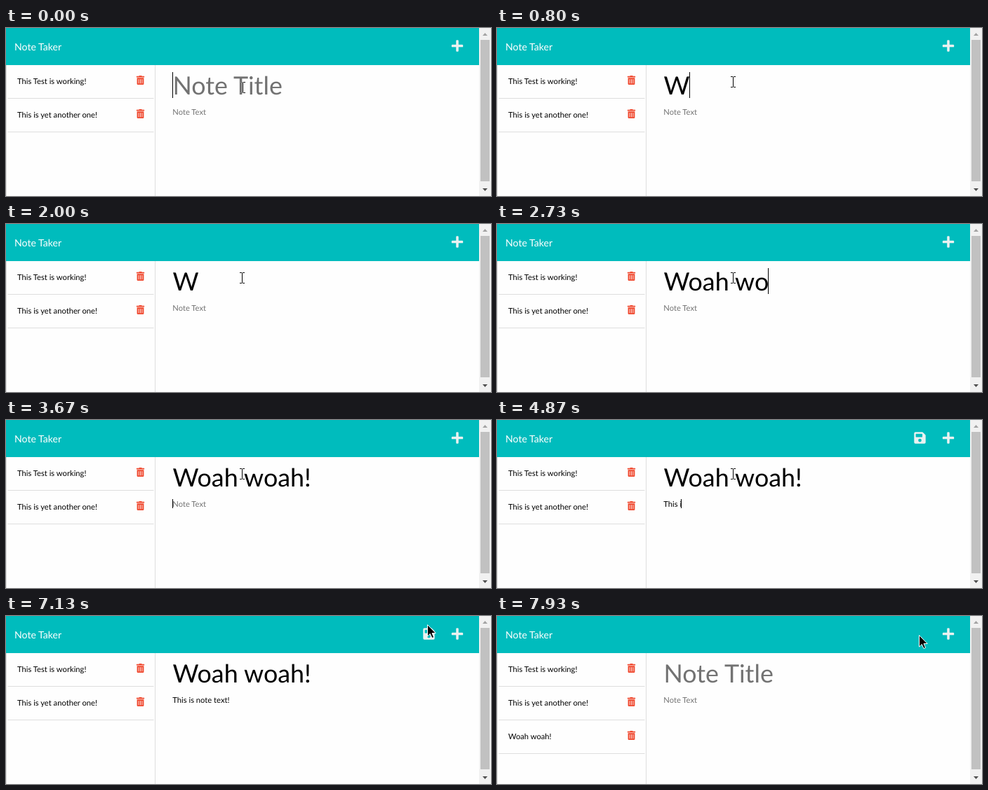
These frames come from a looping animation (691x240 px, 8 s). An HTML page:

```html
<!DOCTYPE html>
<html lang="en">
<head>
<meta charset="utf-8">
<title>Note Taker</title>
<style>
  html, body { margin: 0; width: 100%; height: 100%; overflow: hidden; background: #fefefe; }
  svg { display: block; width: 691px; height: 240px; }
  text { font-family: Lato, sans-serif; font-size: 11.2px; white-space: pre; text-rendering: geometricPrecision; }
  #title { font-size: 35.8px; }
  .brand { font-size: 14.1px; fill: #fff; }
  .line { fill: #dedede; }
  .light { fill: #ebf2f1; }
  #beam { mix-blend-mode: difference; fill: #fff; }
</style>
</head>
<body>
<svg viewBox="0 0 691 240" xmlns="http://www.w3.org/2000/svg">
  <defs>
    <path id="trash" transform="scale(.0254)" fill="#f0492f" d="M32 464a48 48 0 0 0 48 48h288a48 48 0 0 0 48-48V128H32zm272-256a16 16 0 0 1 32 0v224a16 16 0 0 1-32 0zm-96 0a16 16 0 0 1 32 0v224a16 16 0 0 1-32 0zm-96 0a16 16 0 0 1 32 0v224a16 16 0 0 1-32 0zM432 32H312l-9.4-18.7A24 24 0 0 0 281 0H167a24 24 0 0 0-21.4 13.3L136 32H16A16 16 0 0 0 0 48v32a16 16 0 0 0 16 16h416a16 16 0 0 0 16-16V48a16 16 0 0 0-16-16z"/>
  </defs>
  <rect width="691" height="240" fill="#fefefe"/>
  <rect width="674" height="53" fill="#00bcbd"/>
  <text class="brand" x="12" y="32">Note Taker</text>
  <path id="save" class="light" transform="translate(594.3 16.2) scale(.0366)" d="M434 130l-84-84A48 48 0 0 0 316 32H48A48 48 0 0 0 0 80v352a48 48 0 0 0 48 48h352a48 48 0 0 0 48-48V164a48 48 0 0 0-14-34zM224 416a64 64 0 0 1 0-128a64 64 0 0 1 0 128zm96-304V212a12 12 0 0 1-12 12H76a12 12 0 0 1-12-12V108a12 12 0 0 1 12-12h228z"/>
  <path class="light" transform="translate(634.8 16.2) scale(.0366)" d="M416 208H272V64a32 32 0 0 0-32-32h-32a32 32 0 0 0-32 32v144H32a32 32 0 0 0-32 32v32a32 32 0 0 0 32 32h144v144a32 32 0 0 0 32 32h32a32 32 0 0 0 32-32V304h144a32 32 0 0 0 32-32v-32a32 32 0 0 0-32-32z"/>

  <rect class="line" y="53" width="1" height="187"/>
  <rect class="line" x="212" y="53" width="1" height="187"/>
  <g id="list"></g>

  <text id="title" x="237.5" y="95"></text>
  <text id="note" x="237.3" y="124"></text>
  <rect id="caret" width="1"/>

  <rect x="674" width="17" height="240" fill="#f1f1f1"/>
  <rect x="676" y="17" width="13" height="202" fill="#c1c1c1"/>
  <path d="M679 11l3.5-4 3.5 4z" fill="#a3a3a3"/>
  <path d="M679 229h7l-3.5 4z" fill="#505050"/>

  <path id="beam" d="M-3 -8h3v1h-3zM1 -8h3v1h-3zM0 -7h1v14h-1zM-3 7h3v1h-3zM1 7h3v1h-3z"/>
  <path id="arrow" d="M.5.5V17l3.8-3.6L7 19.5l2.6-1.1L7 12.5h5.2z" fill="#000" stroke="#fff"/>
</svg>
<script>
const LOOP = 8000, LEFT = 237, BLINK = 530;
const MOVE = 6730, TURN = 7070, REST = 7600, CLEAR = 7800, ADDED = 7930;
const $ = id => document.getElementById(id);
const show = (el, on) => el.setAttribute("visibility", on ? "visible" : "hidden");
const mix = (a, b, p) => a + (b - a) * p;
const clamp = p => Math.min(1, Math.max(0, p));

// A burst of keys: the shown length goes from one count to another at an even pace
const burst = (phrase, start, end, from, to) => ({ phrase, start, end, from, to });
const first = "Wow it", second = "Woah woah!", body = "This is note text!";
const titleBursts = [
  burst("", 0, 0, 0, 0),
  burst(first, 800, 870, 1, 2),
  burst(first, 1070, 1270, 3, 6),
  burst(first, 1530, 1730, 5, 3),
  burst(first, 1870, 2000, 2, 1),
  burst(second, 2270, 2330, 2, 3),
  burst(second, 2470, 2870, 4, 9),
  burst(second, 3330, 3330, 10, 10)
];
const noteBursts = [
  burst("", 3670, 3670, 0, 0),
  burst(body, 4530, 5330, 1, 12),
  burst(body, 5400, 5600, 13, 15),
  burst(body, 5800, 5930, 16, 17),
  burst(body, 6200, 6200, 18, 18)
];

const latest = (bursts, t) => bursts.filter(b => b.start <= t).pop();

function typed(b, t) {
  if (!b || t >= CLEAR) return "";
  const p = clamp((t - b.start) / (b.end - b.start || 1));
  return b.phrase.slice(0, Math.round(mix(b.from, b.to, p)));
}

// Solid while typing, then blinking; hidden while deleting
function caretOn(b, t) {
  if (t >= CLEAR || b.to < b.from) return false;
  return Math.max(0, t - b.end) % (2 * BLINK) < BLINK;
}

// A sweep up to the toolbar, then a soft settle on the button
function pointer(t) {
  if (t < 270) return [337, 85];
  if (t < TURN) {
    const p = clamp((t - MOVE) / (TURN - MOVE));
    return [mix(336, 602, p * p * (3 - 2 * p)), mix(77, 5, p)];
  }
  const p = clamp((t - TURN) / (REST - TURN));
  return [mix(602, 601, p) - 4 * Math.sin(Math.PI * p), mix(27, 5, (1 - p) ** 3)];
}

const pen = document.createElement("canvas").getContext("2d");
function textWidth(el, str) {
  pen.font = getComputedStyle(el).fontSize + " Lato, sans-serif";
  pen.textRendering = "geometricPrecision";
  return pen.measureText(str).width;
}

$("list").innerHTML = ["This Test is working!", "This is yet another one!", "Woah woah!"]
  .map((name, i) => `<g transform="translate(0 ${i * 48})">
    <text x="16" y="80">${name}</text>
    <use href="#trash" transform="translate(185.8 68)"/>
    <rect class="line" x="2.5" y="100" width="208" height="1"/></g>`).join("");
const added = $("list").lastElementChild;

function field(el, value, hint) {
  const str = value || hint;
  if (el.textContent !== str) el.textContent = str;
  el.setAttribute("fill", value ? "#000" : "#727272");
}

function draw(t) {
  const titleBurst = latest(titleBursts, t), noteBurst = latest(noteBursts, t);
  const title = typed(titleBurst, t), note = typed(noteBurst, t);
  field($("title"), title, "Note Title");
  field($("note"), note, "Note Text");
  show($("save"), title && note);
  show(added, t >= ADDED);

  const caret = $("caret");
  const width = noteBurst ? textWidth($("note"), note) : textWidth($("title"), title);
  caret.setAttribute("x", Math.floor(LEFT + width));
  caret.setAttribute("y", noteBurst ? 113 : 63);
  caret.setAttribute("height", noteBurst ? 13 : 37);
  show(caret, caretOn(noteBurst || titleBurst, t));

  const [x, y] = pointer(t).map(Math.round);
  for (const id of ["beam", "arrow"]) {
    $(id).setAttribute("transform", `translate(${x} ${y})`);
    show($(id), (id === "arrow") === y < 63);
  }
}

const start = performance.now();
function tick() {
  draw((performance.now() - start) % LOOP);
  requestAnimationFrame(tick);
}
tick();
</script>
</body>
</html>
```
